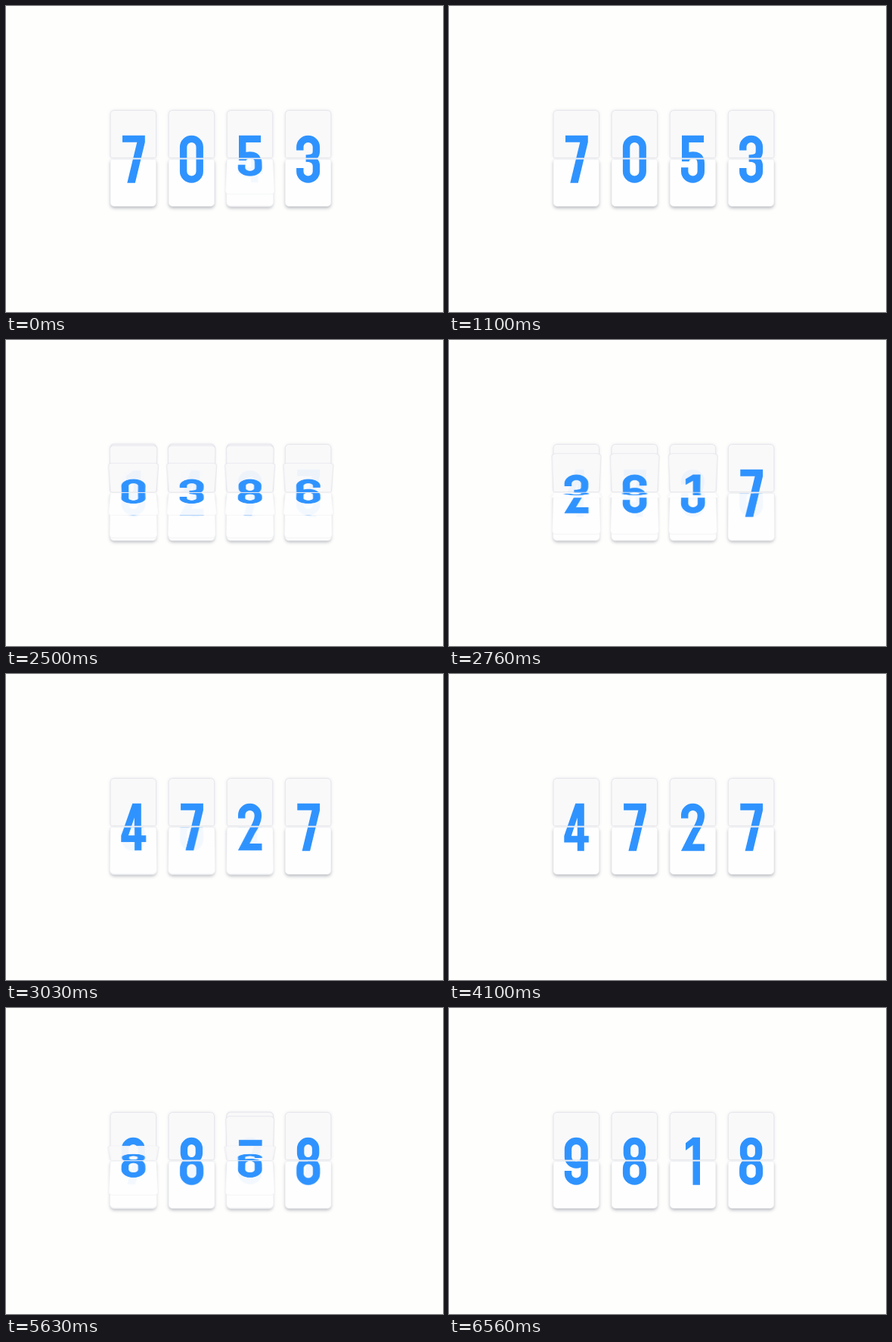
Recreate the animation shown at these times as an HTML page with a canvas. Size 578 by 406 pixels, loop 6.76 s.

```html
<!DOCTYPE html>
<html lang="en">
<head>
<meta charset="utf-8">
<title>Flip counter</title>
<style>
html, body { margin: 0; width: 100%; height: 100%; overflow: hidden; background: #fefefd; }
canvas { display: block; }
</style>
</head>
<body>
<canvas id="stage" width="578" height="406"></canvas>
<script>
const ctx = document.getElementById('stage').getContext('2d');
const LOOP = 6760, TICK = 200 / 3;
const HINGE = 202.5, TOP_H = 64, LOW_H = 63.2, GAP = 1.1;
const CARD_W = 60.4, FIRST_X = 168.3, STEP = 77.1;
const FLIP = 800, STAGGER = 100, DEPTH = 600;
const BLUE = '#2f93ff', SCALE = 2, PAD = 2, FACE_H = TOP_H + 1;

// Each run flips every card upwards by its own number of steps.
const RUNS = [
  { start: -1179, from: [7, 0, 7, 3], steps: [0, 0, 8, 0] },
  { start: 1855, from: [7, 0, 5, 3], steps: [7, 7, 7, 4] },
  { start: 4855, from: [4, 7, 2, 7], steps: [5, 1, 9, 1] }
];

// Glyphs are centred near the hinge, 64 high and about 31 wide.
const stroke = d => ({ path: new Path2D(d) });
const fill = d => ({ path: new Path2D(d), solid: true });
const TOP_ARC = 'V-16.5A10.8 10.8 0 0 1 10.8-16.5';
const LOW_ARC = 'V16.5A10.8 10.8 0 0 1-10.8 16.5';
const GLYPHS = [
  stroke(`M-10.8 0${TOP_ARC}${LOW_ARC}Z`),
  fill('M9.5-32V32H0V-21.5L-9.5-14.5V-24.5L0-32Z'),
  stroke(`M-10.8-12${TOP_ARC}V-15C10.8-7 6 0 2.5 6L-8 27.3H15.5`),
  stroke(`M-10.8-12${TOP_ARC}V-11C10.8-4 7-1.2-3-1.2C7-1.2 10.8 3 10.8 9${LOW_ARC}V12`),
  fill('M-1-32H10.5V11.5H16.5V20.5H10.5V32H1.5V20.5H-16V11.5ZM1.5 11.5V-13L-6.5 11.5Z'),
  stroke(`M14.5-27.3H-9.8V3M-9.8 2C-8-4-4-5.5 0-5.5C8-5.5 10.8-1 10.8 6${LOW_ARC}V11`),
  stroke('M10.8-13V-16.5A10.8 10.8 0 0 0-10.8-16.5V16.5A10.8 10.8 0 0 0 10.8 16.5V6A10.8 10.8 0 0 0-10.8 6'),
  fill('M-14.3-32H15.5V-23L2.5 32H-8L5-23H-14.3Z'),
  stroke('M-10-11V-17A10 10.3 0 0 1 10-17V-11A10 10.3 0 0 1-10-11Z' +
    'M-10.8 10V16.5A10.8 10.8 0 0 0 10.8 16.5V10A10.8 10.8 0 0 0-10.8 10Z'),
  stroke('M-10.8 13V16.5A10.8 10.8 0 0 0 10.8 16.5V-16.5A10.8 10.8 0 0 0-10.8-16.5V-6A10.8 10.8 0 0 0 10.8-6')
];

function halfPath(c, top) {
  c.beginPath();
  if (top) c.roundRect(-CARD_W / 2, -TOP_H, CARD_W, TOP_H - GAP, [5, 5, 2, 2]);
  else c.roundRect(-CARD_W / 2, GAP, CARD_W, LOW_H - GAP, [2, 2, 5, 5]);
}

function paintHalf(c, top, digit, alpha) {
  c.save();
  halfPath(c, top);
  c.globalAlpha = alpha;
  c.fillStyle = top ? '#f9f9fa' : '#fefefe';
  c.fill();
  c.strokeStyle = top ? 'rgba(224,225,231,.75)' : 'rgba(234,235,240,.6)';
  c.lineWidth = 1;
  c.stroke();
  c.globalAlpha = 1;
  c.clip();
  c.translate(0, 0.8);
  c.scale(1, 0.985);
  const glyph = GLYPHS[digit];
  c.fillStyle = c.strokeStyle = BLUE;
  c.lineWidth = 9.4;
  if (glyph.solid) c.fill(glyph.path, 'evenodd');
  else c.stroke(glyph.path);
  c.restore();
}

function makeFace(top, digit) {
  const face = document.createElement('canvas');
  face.width = (CARD_W + 2 * PAD) * SCALE;
  face.height = FACE_H * SCALE;
  const c = face.getContext('2d');
  c.scale(SCALE, SCALE);
  c.translate(CARD_W / 2 + PAD, top ? FACE_H : 0);
  paintHalf(c, top, digit, 0.95);
  return face;
}
const FACES = [false, true].map(top => GLYPHS.map((_, digit) => makeFace(top, digit)));

// Projects a leaf turned about the hinge, one pixel row at a time.
function drawLeaf(cx, digit, angle) {
  const top = angle < Math.PI / 2, face = FACES[+top][digit];
  const cos = Math.abs(Math.cos(angle)), sin = Math.sin(angle);
  const reach = FACE_H * cos * DEPTH / (DEPTH - FACE_H * sin);
  if (reach < 0.3) return;
  const radius = d => Math.min(FACE_H, d * DEPTH / (cos * DEPTH + d * sin));
  const from = top ? HINGE - reach : HINGE, to = top ? HINGE : HINGE + reach;
  for (let row = Math.floor(from); row < to; row++) {
    const a = Math.max(row, from), b = Math.min(row + 1, to);
    const ra = radius(Math.abs(a - HINGE)), rb = radius(Math.abs(b - HINGE));
    const zoom = DEPTH / (DEPTH - (ra + rb) / 2 * sin);
    const width = (CARD_W + 2 * PAD) * zoom;
    const sy = (top ? FACE_H - ra : ra) * SCALE, sh = Math.abs(rb - ra) * SCALE;
    ctx.drawImage(face, 0, sy, face.width, sh, cx - width / 2, a, width, b - a);
  }
}

function shadow(c, top, color, blur, y) {
  c.save();
  c.shadowColor = color;
  c.shadowBlur = blur;
  c.shadowOffsetY = y;
  c.fillStyle = '#fff';
  halfPath(c, top);
  c.fill();
  c.restore();
}

function ease(u) {
  return u < 0.5 ? 4 * u ** 3 : 1 - 4 * (1 - u) ** 3;
}

function drawCard(cx, first, steps, elapsed) {
  const leaves = [];
  let started = 0, landed = 0;
  for (let k = 0; k < steps; k++) {
    const u = (elapsed - k * STAGGER) / FLIP;
    if (u > 0) started++;
    if (u >= 1) landed++;
    if (u > 0 && u < 1) leaves.push({ k, angle: Math.PI * ease(u) });
  }
  const digit = n => (first + n) % 10;

  ctx.save();
  ctx.translate(cx, HINGE);
  shadow(ctx, true, 'rgba(90,100,135,.18)', 4, 0);
  shadow(ctx, false, 'rgba(50,52,70,.34)', 4, 2.5);
  paintHalf(ctx, true, digit(started), 1);
  paintHalf(ctx, false, digit(landed), 1);
  ctx.restore();

  const rising = leaves.filter(l => l.angle < Math.PI / 2).reverse();
  const falling = leaves.filter(l => l.angle >= Math.PI / 2);
  for (const l of rising) drawLeaf(cx, digit(l.k), l.angle);
  for (const l of falling) drawLeaf(cx, digit(l.k + 1), l.angle);
}

function draw(time) {
  const run = RUNS.filter(r => r.start <= time).pop();
  ctx.fillStyle = '#fefefd';
  ctx.fillRect(0, 0, 578, 406);
  run.from.forEach((first, i) =>
    drawCard(FIRST_X + i * STEP, first, run.steps[i], time - run.start));
}

ctx.imageSmoothingQuality = 'high';
const begin = performance.now();
function frame() {
  const time = (performance.now() - begin) % LOOP;
  // The counter advances at fifteen pictures a second.
  draw(time < 30 ? 0 : 30 + Math.floor((time - 26) / TICK) * TICK);
  requestAnimationFrame(frame);
}
frame();
</script>
</body>
</html>
```
